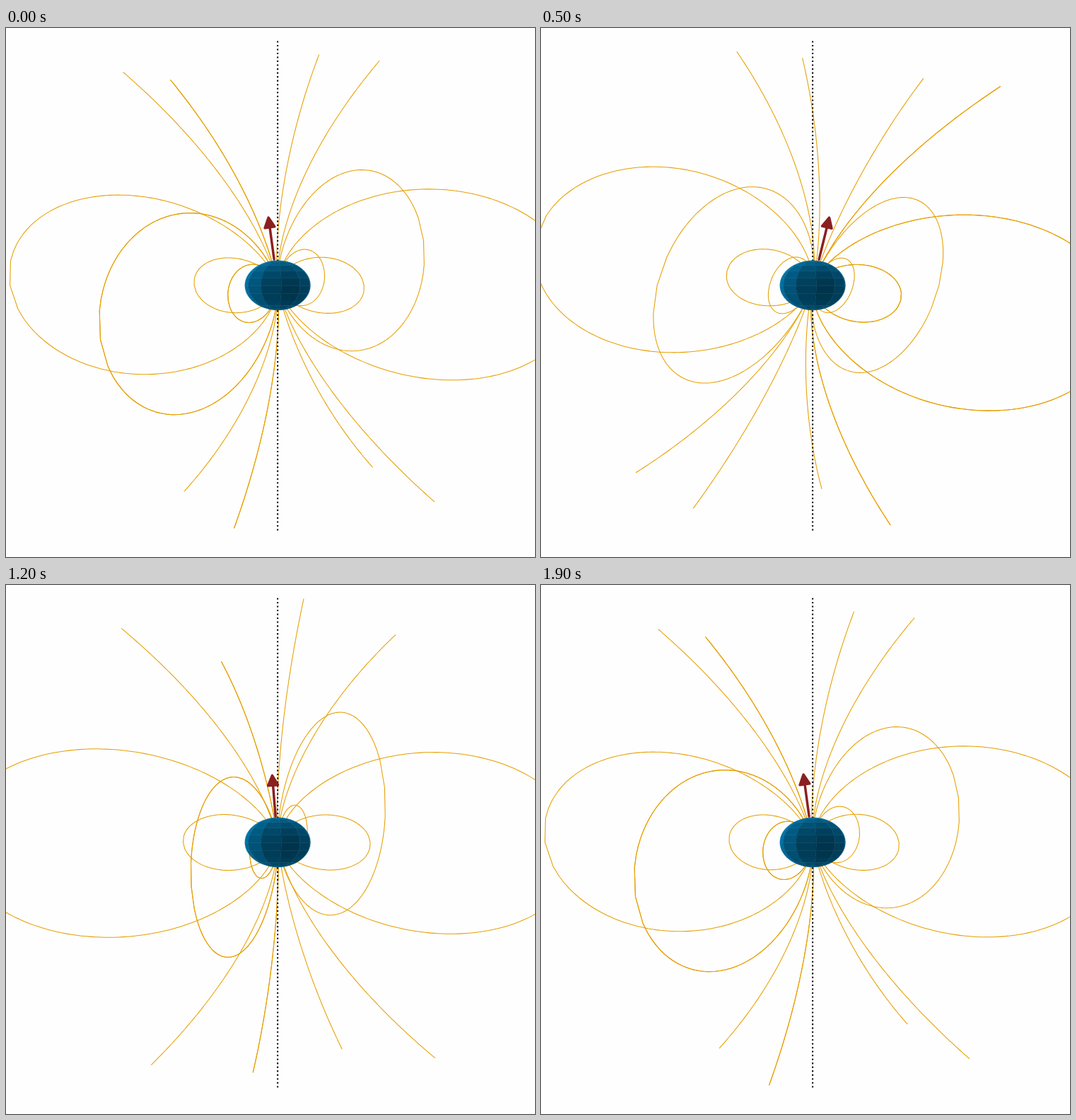
Write an HTML page with a canvas that moves like this. It is 748 px wide and 748 px high and loops after 2000 ms.

```html
<!DOCTYPE html>
<html lang="en">
<head>
<meta charset="utf-8">
<title>Rotating tilted dipole</title>
<style>
  html, body { margin: 0; width: 100%; height: 100%; overflow: hidden; background: #fefefe; }
  canvas { display: block; width: 748px; height: 748px; }
</style>
</head>
<body>
<canvas id="stage" width="748" height="748"></canvas>
<script>
const ctx = document.getElementById('stage').getContext('2d');
const SIZE = 748, STEP_MS = 100, STEPS = 20;
const CX = 384.1, CY = 363.9;           // projected origin
const UX = 46.2, UY = 34.66;            // pixels per body radius
const EYE = 87.5;                       // eye distance in body radii
const RAD = Math.PI / 180;
const TILT = 11.5 * RAD, START = -30 * RAD;
const SHELLS = [3, 10, 50], R_MAX = 10, SAMPLES = 80;
const LINE = '#e69f00', ARROW = '#8b2020';

// x to the right, y up, z towards the viewer
function project([x, y, z]) {
  const s = EYE / (EYE - z);
  return [CX + x * UX * s, CY - y * UY * s];
}

// Spherical point; azimuth 0 faces the viewer and grows to the right
function polar(r, theta, azimuth) {
  const h = r * Math.sin(theta);
  return [h * Math.sin(azimuth), r * Math.cos(theta), h * Math.cos(azimuth)];
}

// Lean the magnetic frame over, then turn it about the vertical axis
function orient([x, y, z], spin) {
  const ct = Math.cos(TILT), st = Math.sin(TILT);
  const up = y * ct - z * st, out = y * st + z * ct;
  const c = Math.cos(spin), s = Math.sin(spin);
  return [x * c + out * s, up, out * c - x * s];
}

function trace(points) {
  ctx.beginPath();
  points.forEach(p => ctx.lineTo(...project(p)));
}

// r = L sin²θ, sampled evenly in r; one half per hemisphere
function fieldLine(shell, azimuth) {
  const end = Math.min(shell, R_MAX);
  const north = [], south = [];
  for (let i = 0; i < SAMPLES; i++) {
    const r = 1 + (end - 1) * i / (SAMPLES - 1);
    const theta = Math.asin(Math.min(1, Math.sqrt(r / shell)));
    north.push(polar(r, theta, azimuth));
    south.push(polar(r, Math.PI - theta, azimuth));
  }
  return shell > R_MAX ? [north, south] : [north.concat(south.reverse())];
}

// The first meridian is drawn twice, which makes it slightly bolder
const fieldLines = [0, 90, 180, 270, 360].flatMap(a =>
  SHELLS.flatMap(shell => fieldLine(shell, a * RAD)));

function drawField(spin) {
  ctx.strokeStyle = LINE;
  ctx.lineWidth = 1.05;
  ctx.lineJoin = 'round';
  for (const line of fieldLines) {
    trace(line.map(p => orient(p, spin)));
    ctx.stroke();
  }
}

function drawAxis() {
  ctx.strokeStyle = '#000';
  ctx.lineWidth = 2.08;
  ctx.setLineDash([2.08, 3.44]);
  trace([[0, -10, 0], [0, 10, 0]]);
  ctx.stroke();
  ctx.setLineDash([]);
}

function drawArrow(spin) {
  const [x0, y0] = project(orient([0, 1, 0], spin));
  const [x1, y1] = project(orient([0, 3, 0], spin));
  const width = 3.5, gap = 2.78, head = 13.9, half = 6.95;
  const tip = Math.hypot(x1 - x0, y1 - y0) - gap - 1.118 * width;
  ctx.save();
  ctx.translate(x0, y0);
  ctx.rotate(Math.atan2(y1 - y0, x1 - x0));
  ctx.strokeStyle = ctx.fillStyle = ARROW;
  ctx.lineWidth = width;
  ctx.lineCap = ctx.lineJoin = 'round';
  ctx.beginPath();
  ctx.moveTo(gap, 0);
  ctx.lineTo(tip - head, 0);
  ctx.stroke();
  ctx.beginPath();
  ctx.moveTo(tip, 0);
  ctx.lineTo(tip - head, half);
  ctx.lineTo(tip - head, -half);
  ctx.closePath();
  ctx.fill();
  ctx.stroke();
  ctx.restore();
}

function shade(theta, azimuth) {
  const n = polar(1, theta, azimuth);
  const light = polar(1, 74 * RAD, -156 * RAD);
  const dot = n.reduce((sum, v, i) => sum + v * light[i], 0);
  const t = Math.min(1, (dot + 1) / 1.4);
  return `rgb(0,${Math.round(52 + 66 * t)},${Math.round(76 + 94 * t)})`;
}

// Coarse facets with finely sampled rims
function drawBody() {
  const cell = 36.364 * RAD, row = 18.182 * RAD, fine = 10;
  for (let j = -2; j < 4; j++) {
    const a0 = -30 * RAD + (j < 0 ? j * cell + 3.64 * RAD : j * cell);
    const a1 = j === -1 ? -30 * RAD : a0 + cell;
    const left = Math.max(a0, -Math.PI / 2), right = Math.min(a1, Math.PI / 2);
    if (left >= right) continue;
    for (let i = 0; i < 10; i++) {
      const t0 = i * row, t1 = Math.min(Math.PI, t0 + row);
      const rim = [];
      const edge = (ta, aa, tb, ab) => {
        for (let k = 0; k < fine; k++) {
          const f = k / fine;
          rim.push(polar(1, ta + (tb - ta) * f, aa + (ab - aa) * f));
        }
      };
      edge(t0, left, t0, right);
      edge(t0, right, t1, right);
      edge(t1, right, t1, left);
      edge(t1, left, t0, left);
      trace(rim);
      ctx.closePath();
      ctx.fillStyle = ctx.strokeStyle = shade((t0 + t1) / 2, (a0 + a1) / 2);
      ctx.lineWidth = 0.5;
      ctx.fill();
      ctx.stroke();
    }
  }
}

function draw(step) {
  const spin = START + step / (STEPS - 1) * 2 * Math.PI;
  ctx.fillStyle = '#fefefe';
  ctx.fillRect(0, 0, SIZE, SIZE);
  ctx.lineCap = 'butt';
  drawField(spin);
  drawAxis();
  drawArrow(spin);
  drawBody();
}

const began = performance.now();
let shown = -1;
function tick() {
  const step = Math.floor((performance.now() - began) / STEP_MS) % STEPS;
  if (step !== shown) draw(shown = step);
  requestAnimationFrame(tick);
}
tick();
</script>
</body>
</html>
```
